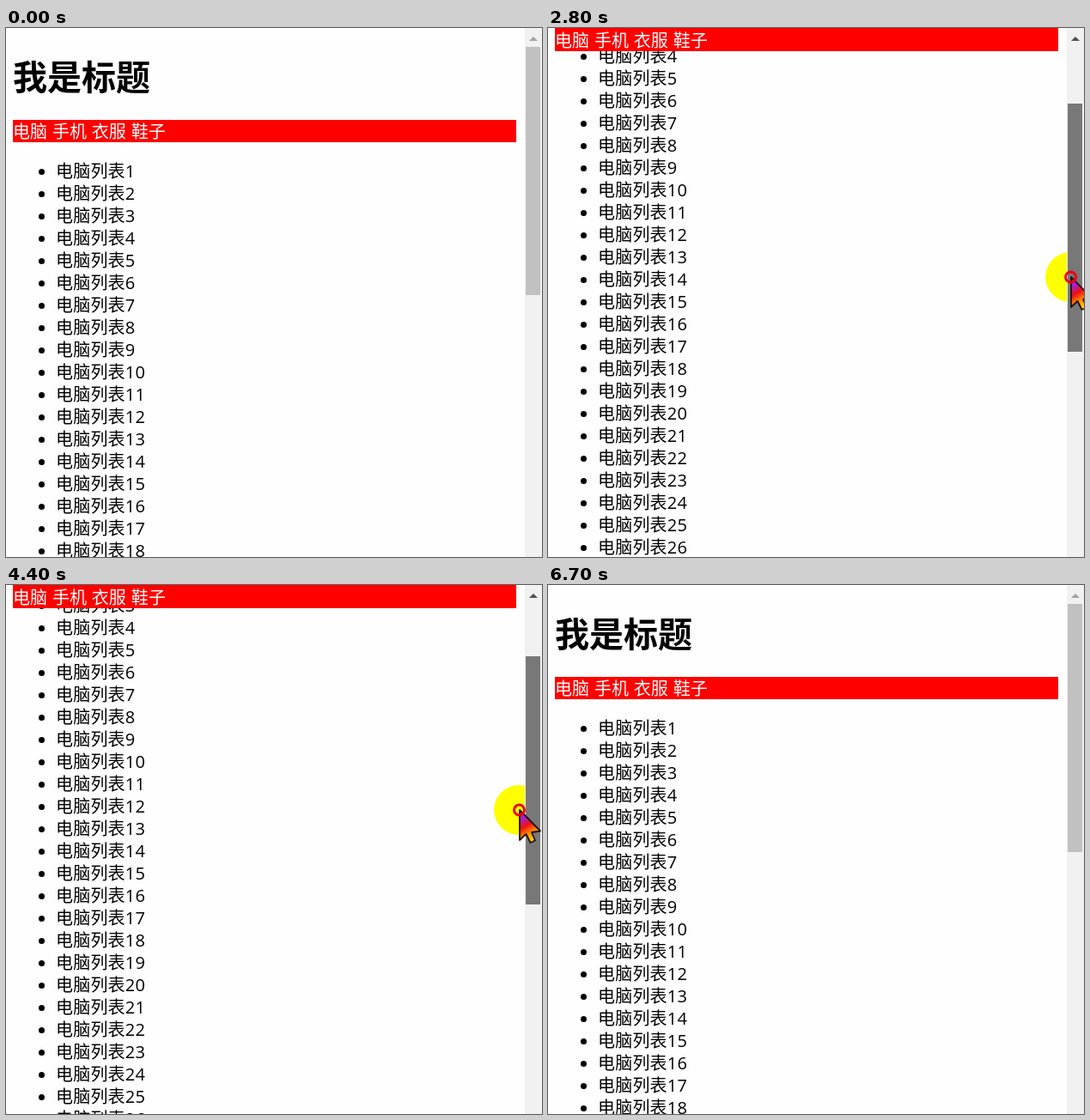
An HTML page that plays this animation: 624x616 px, repeating every 6800 ms.

```html
<!DOCTYPE html>
<html lang="zh-CN">
<head>
<meta charset="utf-8">
<title>吸顶导航</title>
<style>
  html, body { margin: 0; width: 100%; height: 100%; overflow: hidden; background: #fefefe; }
  body {
    position: relative;
    color: #000;
    font: 20px/26px "Open Sans", "Noto Sans CJK SC", "Noto Sans CJK", sans-serif;
  }
  #page, #nav, #bar, #thumb, #up, #halo, #pointer { position: absolute; }
  #page { left: 8px; top: 0; width: 586px; }
  h1 { position: absolute; left: 0; top: 31px; margin: 0; font-size: 40px; line-height: 52px; font-weight: 700; white-space: nowrap; }
  ul { position: absolute; left: 0; top: 154px; margin: 0; padding: 0 0 0 50px; list-style: none; }
  li { position: relative; height: 26px; white-space: nowrap; letter-spacing: .2px; }
  li::before { content: ""; position: absolute; left: -20px; top: 10px; width: 7px; height: 7px; border-radius: 50%; background: #000; }
  #nav { left: 8px; top: 0; width: 586px; height: 26px; line-height: 28px; background: #f00; color: #fff; word-spacing: .7px; white-space: nowrap; }
  #nav.stuck { box-shadow: 0 -1px #f00; }
  #bar { left: 604px; top: 0; width: 20px; height: 616px; background: #f1f1f1; }
  #thumb { left: 1px; top: 0; width: 17px; height: 289px; background: #c1c1c1; }
  #thumb.hover { background: #a8a8a8; }
  #thumb.pressed { background: #787878; }
  #up { left: 5px; top: 10px; border: solid transparent; border-width: 0 5px 5px; border-bottom-color: currentColor; }
  #halo { left: -30px; top: -29px; width: 58px; height: 58px; border-radius: 50%; background: #ff0; }
  #pointer { left: 0; top: 0; width: 1px; height: 1px; overflow: visible; }
</style>
</head>
<body>
<div id="page">
  <h1>我是标题</h1>
  <ul id="list"></ul>
</div>
<div id="nav">电脑 手机 衣服 鞋子</div>
<div id="halo"></div>
<div id="bar"><div id="up"></div><div id="thumb"></div></div>
<svg id="pointer">
  <defs>
    <linearGradient id="fire" gradientUnits="userSpaceOnUse" x1="2" y1="6" x2="18" y2="34">
      <stop offset=".1" stop-color="#a020e0"/>
      <stop offset=".42" stop-color="#f01010"/>
      <stop offset=".7" stop-color="#ff8a00"/>
      <stop offset="1" stop-color="#ffd800"/>
    </linearGradient>
  </defs>
  <path d="M0 0V35L7.5 28L12.5 38L18 35.5L14 26L24 24.5Z" fill="url(#fire)" stroke="#201010" stroke-width="1.8" stroke-linejoin="round"/>
  <circle id="ring" cx="-.5" r="6" fill="none" stroke="#f00010" stroke-width="3"/>
</svg>
<script>
  const LOOP = 6800, STEP = 100;
  const PRESS = 1400, TURN = 4000, RELEASE = 5500;
  const RATIO = 3.19; // page pixels per thumb pixel
  const $ = id => document.getElementById(id);

  const ramp = (t, a, b) => Math.min(1, Math.max(0, (t - a) / (b - a)));
  const smooth = p => p * p * (3 - 2 * p);

  // Drag: [time, page offset]
  const drag = [
    [1500, 0], [1700, 13], [2100, 101], [2800, 212],
    [3900, 370], [TURN, 364], [4800, 25], [4900, 0]
  ];
  const scrollAt = t => drag.slice(1).reduce((s, [end, to], i) => {
    const [begin, from] = drag[i];
    return s + (to - from) * ramp(t, begin, end);
  }, 0);

  // Eased pointer moves, added up: enter, hover, sideways drift, rest, leave, sink
  const moves = [
    { from: 100, to: 200, dx: -8, dy: -2 },
    { from: 300, to: 900, dx: -10, dy: -14 },
    { from: 1700, to: 4800, dx: -17, dy: 0 },
    { from: 4800, to: 5300, dx: -2, dy: -11 },
    { from: 5500, to: 6100, dx: -131, dy: 385 },
    { from: 6100, to: 6700, dx: -14, dy: 60 }
  ];
  function pointerAt(t, scroll) {
    let x = 632, y = 240;
    for (const m of moves) {
      const p = smooth(ramp(t, m.from, m.to));
      x += m.dx * p;
      y += m.dy * p;
    }
    // on the way back up the pointer runs ahead of the thumb
    y += t < TURN ? scroll / RATIO : 83 - 90 * ramp(t, TURN, 4800);
    return [Math.round(x), Math.round(y)];
  }

  for (let n = 1; n <= 60; n++) {
    const li = document.createElement("li");
    li.textContent = "电脑列表" + n;
    $("list").append(li);
  }

  function draw(t) {
    const scroll = Math.round(scrollAt(t));
    const [x, y] = pointerAt(t, scroll);
    const visible = t >= 100 && t < 6700;
    const pressed = t >= PRESS && t < RELEASE;
    const navTop = Math.max(1, 107 - scroll);
    const thumbTop = Math.max(22, Math.floor(21.9 + scroll / RATIO));

    $("page").style.transform = `translateY(${-scroll}px)`;
    $("nav").style.transform = `translateY(${navTop}px)`;
    $("nav").classList.toggle("stuck", navTop === 1);

    $("thumb").style.transform = `translateY(${thumbTop}px)`;
    $("thumb").classList.toggle("hover", visible && x >= 605 && x <= 622);
    $("thumb").classList.toggle("pressed", pressed);
    $("up").style.color = scroll > 0 ? "#505050" : "#a3a3a3";

    for (const id of ["halo", "pointer"]) {
      $(id).style.transform = `translate(${x}px, ${y}px)`;
      $(id).style.visibility = visible ? "visible" : "hidden";
    }
    $("ring").style.display = pressed ? "" : "none";
  }

  const start = performance.now();
  function tick() {
    const t = (performance.now() - start) % LOOP;
    draw(Math.floor(t / STEP) * STEP);
    requestAnimationFrame(tick);
  }
  tick();
</script>
</body>
</html>
```
